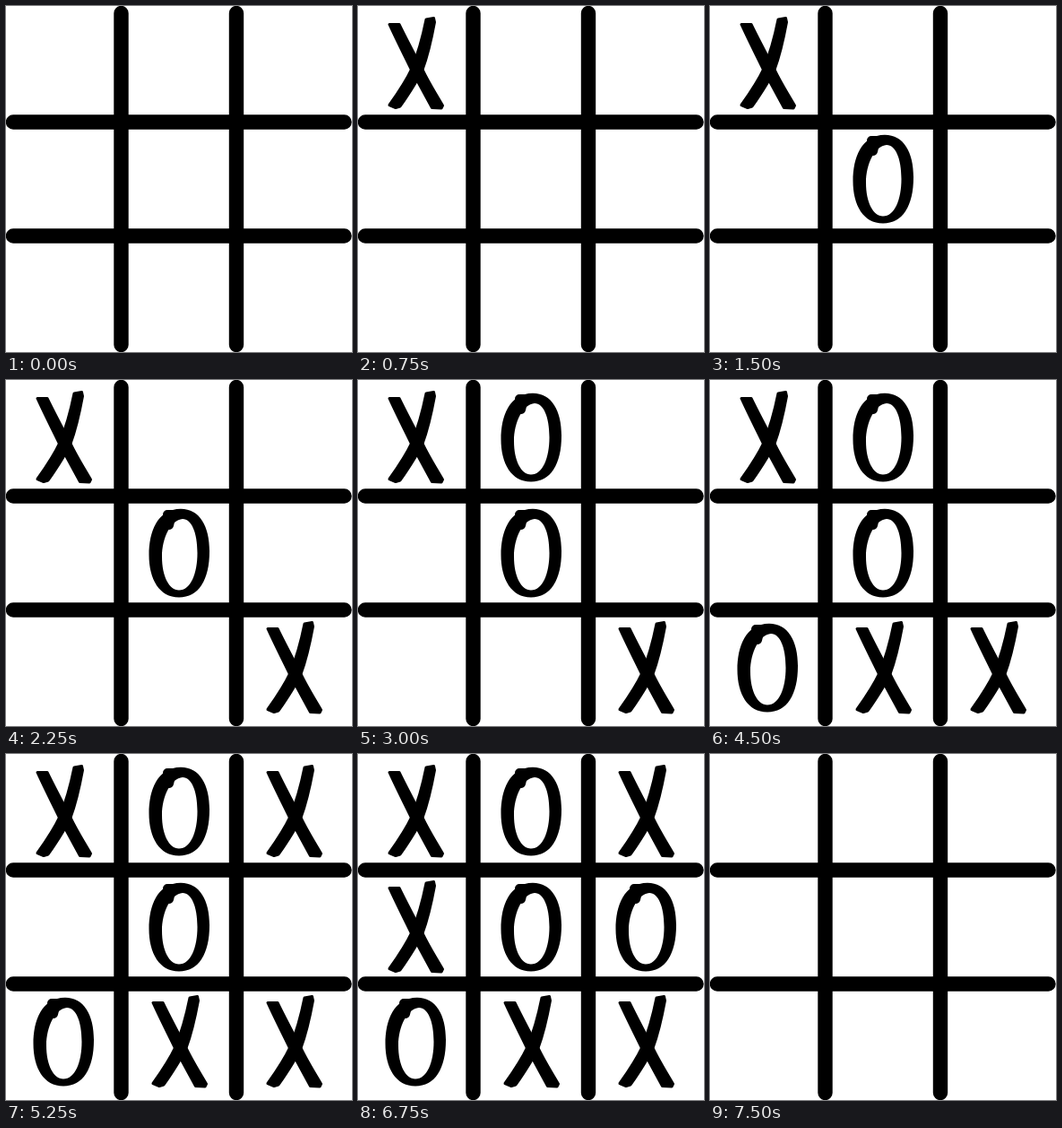
An HTML page that plays this animation: 386 px wide and 386 px high, repeating every 8000 ms.

```html
<!DOCTYPE html>
<html lang="en">
<head>
<meta charset="utf-8">
<title>Noughts and crosses</title>
<style>
  html, body { margin: 0; width: 100%; height: 100%; overflow: hidden; background: #fff; }
  svg { display: block; width: 100%; height: 100%; }
</style>
</head>
<body>
<svg viewBox="0 0 386 386">
  <defs>
    <g id="X" stroke="#000" stroke-width="3" stroke-linejoin="round">
      <path d="M76 15L84.5 13.5L85.5 18C82 37 78 55 72 71C65 86 56 99 47 112L42 113.5L35 110.5C44 98 53 85 60 70C67 53 72 35 76 15Z"/>
      <path d="M35 20.5L46 20.5C54 37 63 54 71 69C78 84 86 97 94.5 111L93 114L82.5 113.5C74 98 67 85 59 70C51 54 43 38 35 20.5Z"/>
    </g>
    <g id="O">
      <path fill-rule="evenodd" d="M66 14.7C87 14.7 98 34 98 62C98 94 86 113.5 64 113.5C42 113.5 30.5 93 30.5 66C30.5 40 40 14.7 66 14.7Z
        M68 26C55 27 45 47 45 68C45 90 53 105.5 64 105.5C77 105.5 84.5 87 84.5 64C84.5 41 78 26 68 26Z"/>
      <path d="M51 21L56 21L53 33" fill="none" stroke="#000" stroke-width="10" stroke-linecap="round" stroke-linejoin="round"/>
    </g>
  </defs>
  <path d="M128.5 8V378M257 8V378M8 129.5H377.5M8 256.5H377.5" stroke="#000" stroke-width="16.4" stroke-linecap="round"/>
  <g id="marks"></g>
</svg>
<script>
  const LOOP = 8000, STEP = 750, CLEAR = 7500;
  const OFFSETS = [0, 129, 257];
  // Column and row of each move; X begins and the players alternate.
  const MOVES = [[0, 0], [1, 1], [2, 2], [1, 0], [1, 2], [0, 2], [2, 0], [2, 1], [0, 1]];

  const marks = MOVES.map(([column, row], i) => {
    const mark = document.createElementNS("http://www.w3.org/2000/svg", "use");
    mark.setAttribute("href", i % 2 ? "#O" : "#X");
    mark.setAttribute("x", OFFSETS[column]);
    mark.setAttribute("y", OFFSETS[row]);
    return document.getElementById("marks").appendChild(mark);
  });

  const start = performance.now();
  function draw() {
    const time = (performance.now() - start) % LOOP;
    marks.forEach((mark, i) => {
      const visible = time >= (i + 1) * STEP && time < CLEAR;
      mark.setAttribute("visibility", visible ? "visible" : "hidden");
    });
    requestAnimationFrame(draw);
  }
  draw();
</script>
</body>
</html>
```
